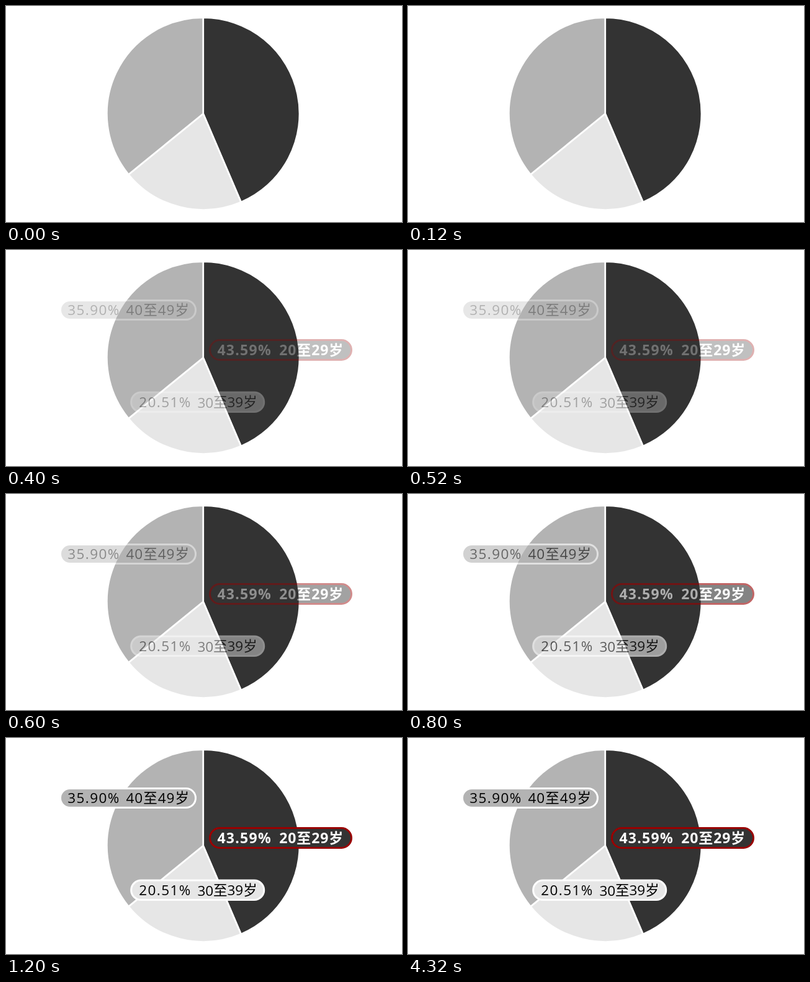
An HTML page that plays this animation: 638x349 px, repeating every 6.4 s.

```html
<!DOCTYPE html>
<html lang="zh-CN">
<head>
<meta charset="utf-8">
<title>Age groups</title>
<style>
  html, body { margin: 0; width: 100%; height: 100%; overflow: hidden; background: #fff; }
  svg { display: block; }
  text { font: 400 22.5px "Open Sans", "Noto Sans CJK SC", "Noto Sans CJK", sans-serif; }
  .bold text { font-weight: 700; font-size: 23px; }
</style>
</head>
<body>
<svg width="638" height="349" viewBox="0 0 638 349">
  <g id="pie" stroke="#fff" stroke-width="2.7"></g>
  <g id="labels"></g>
</svg>
<script>
const LOOP = 6400, STEP = 200, STEPS = 6, FADE = 0.15;
const CX = 317.7, CY = 174, R = 155.3;
const pie = document.getElementById('pie');
const labels = document.getElementById('labels');

function add(parent, tag, attrs, text = '') {
  const node = document.createElementNS('http://www.w3.org/2000/svg', tag);
  for (const key in attrs) node.setAttribute(key, attrs[key]);
  node.textContent = text;
  return parent.appendChild(node);
}

function rim(share) {
  const a = share * 2 * Math.PI;
  return `${CX + R * Math.sin(a)} ${CY - R * Math.cos(a)}`;
}

function slice(from, to, fill) {
  add(pie, 'path', { d: `M${CX} ${CY}L${rim(from)}A${R} ${R} 0 0 1 ${rim(to)}Z`, fill });
}

// Each part of a label: [text, x, baseline, letter spacing]
function label(x, y, width, height, fill, stroke, color, parts, cls = '') {
  const g = add(labels, 'g', { class: cls });
  add(g, 'rect', { x, y, width, height, rx: height / 2, fill, stroke, 'stroke-width': 3 });
  for (const [str, tx, ty, spacing] of parts)
    add(g, 'text', { x: tx, y: ty, fill: color, 'letter-spacing': spacing }, str);
}

slice(0, 0.4359, '#333');
slice(0.4359, 0.641, '#e6e6e6');
slice(0.641, 1, '#b3b3b3');

label(87.5, 81.5, 218, 31, '#b3b3b3', '#fff', '#000',
  [['35.90%', 99.3, 105.3, 1.4], ['40至49岁', 193.5, 105.3, 1]]);
label(328.5, 145.5, 228, 32, '#333', '#900', '#fff',
  [['43.59%', 340.4, 169.5, 1.3], ['20至29岁', 440.3, 169.5, 0.9]], 'bold');
label(201.7, 230, 214, 31.5, '#e6e6e6', '#fff', '#000',
  [['20.51%', 214.3, 254.3, 1.4], ['30', 308.5, 255, 0], ['至39岁', 334, 254.3, 0]]);

// The labels brighten in hard steps, then jump to full strength and hold.
function draw() {
  const step = Math.floor(performance.now() % LOOP / STEP);
  const opacity = step < STEPS ? step * FADE : 1;
  for (const g of labels.children) g.setAttribute('opacity', opacity);
  requestAnimationFrame(draw);
}
draw();
</script>
</body>
</html>
```
